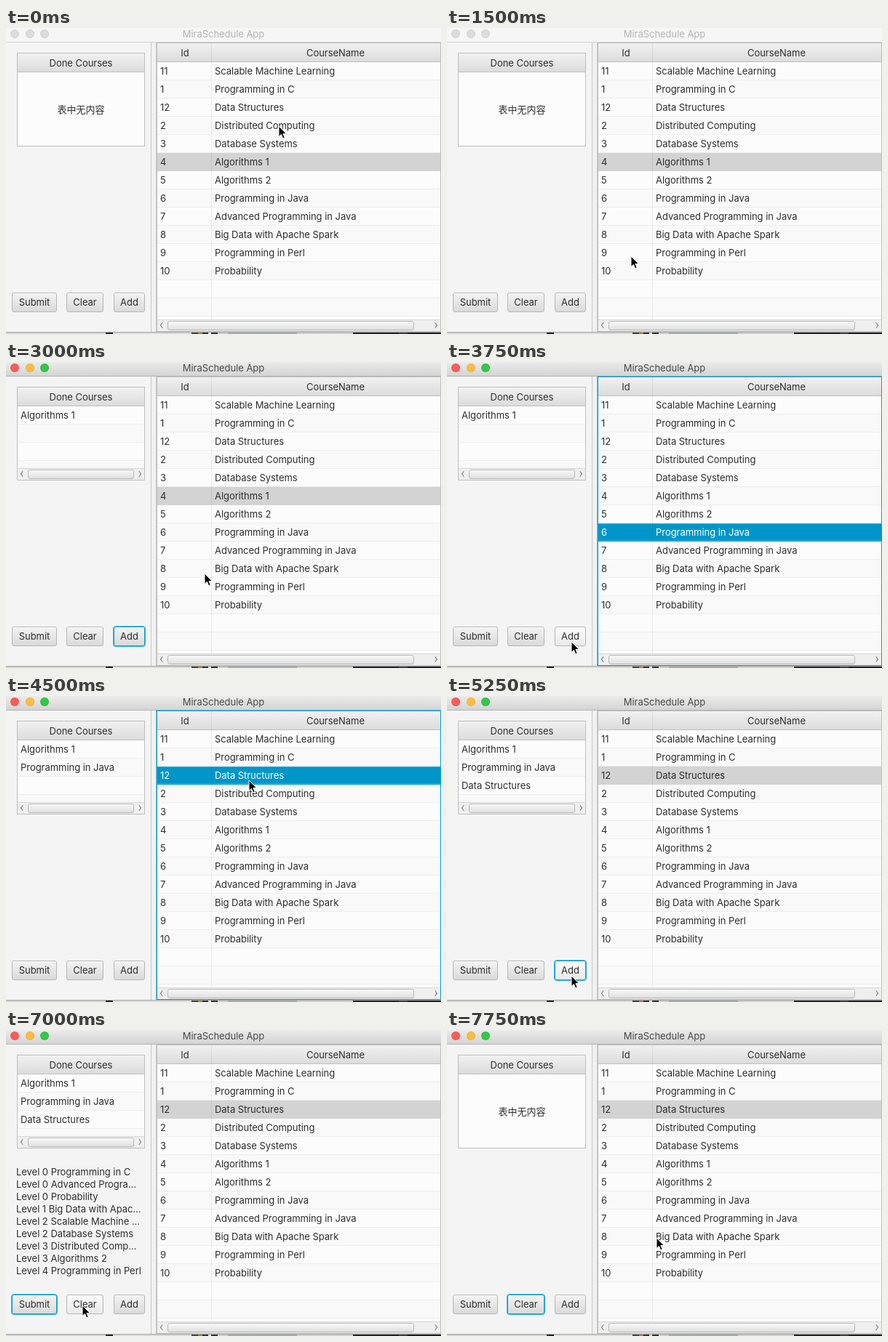
An HTML page for the animation above (8000 ms loop, 598 by 421 pixels).

```html
<!DOCTYPE html>
<html lang="en">
<head>
<meta charset="utf-8">
<title>Course planner</title>
<style>
html, body { margin: 0; width: 100%; height: 100%; overflow: hidden; }
body { position: relative; background: #f4f4f4; color: #2d2d2d; font: 13px Inter, "Noto Sans", sans-serif; letter-spacing: -.04px; cursor: default; }
div { box-sizing: border-box; white-space: pre; }
#stage { position: absolute; left: 0; top: 0; width: 598px; height: 421px; overflow: hidden; }
#stage div, #pointer { position: absolute; }

#bar { left: 0; top: 0; width: 598px; height: 20px; line-height: 17px; text-align: center; color: #b4b4b4; background: #f6f6f6; border-bottom: 1px solid #d2d2d2; }
.light { top: 2px; width: 12px; height: 12px; border-radius: 50%; background: #dcdcdc; border: 1px solid #d0d0d0; }
.active #bar { color: #484848; background: linear-gradient(#ebebeb, #d4d4d4); border-color: #b4b4b4; }
.active .light { border-color: #0001; }
.active .light:nth-child(1) { background: #fc5b57; }
.active .light:nth-child(2) { background: #fdbc40; }
.active .light:nth-child(3) { background: #33c748; }

#divider { left: 199px; top: 20px; width: 8px; height: 398px; border: solid #c8c8c8; border-width: 0 1px; background: #f1f1f1; }
.table { background: #fcfcfc; border: 1px solid #bebebe; overflow: hidden; }
#done { left: 15px; top: 34px; width: 176px; height: 129px; }
#courses { left: 207px; top: 20px; width: 391px; height: 398px; }
#courses.focused { border-color: #079fd3; box-shadow: 0 0 0 1px #079fd366; }
.head { left: 0; top: 0; width: 100%; height: 26px; line-height: 26px; text-align: center; background: linear-gradient(#f1f1f1, #dcdcdc); border-bottom: 1px solid #c0c0c0; }
.head div { top: 0; height: 26px; }
.row { left: 0; width: 100%; height: 25px; line-height: 25px; border-bottom: 1px solid #ededed; }
.row:nth-child(odd) { background: #f9f9f9; }
.row div { top: 0; left: 4px; }
.row .name { left: 79px; }
.row.picked { background: #d3d3d3; border-color: #d3d3d3; }
.focused .row.picked { background: #0096c9; border-color: #0096c9; color: #fff; box-shadow: inset 0 1px #38aed6, inset 0 -1px #38aed6; }
.rule { left: 74px; top: 0; width: 1px; height: 380px; background: #0001; }
#empty { left: 0; top: 27px; width: 100%; height: 101px; line-height: 99px; text-align: center; background: #fcfcfc; font-family: "Noto Sans CJK SC", "Noto Sans CJK", sans-serif; }

.scroll { left: 0; bottom: 0; width: 100%; height: 16px; background: #efefef; border-top: 1px solid #d6d6d6; }
.thumb { top: 1px; left: 14px; height: 13px; border: 1px solid #b8b8b8; border-radius: 3px; background: linear-gradient(#f8f8f8, #e0e0e0); }
.arrow { top: 4px; width: 6px; height: 6px; border: solid #666; border-width: 0 0 1.3px 1.3px; transform: scaleX(.7) rotate(45deg); left: 4px; }
.arrow.next { left: auto; right: 4px; transform: scaleX(.7) rotate(225deg); }

.button { top: 364px; height: 27px; line-height: 25px; text-align: center; border: 1px solid #b6b6b6; border-radius: 3px; background: linear-gradient(#f3f3f3, #dadada); box-shadow: inset 0 1px #fff; }
.button.hover { background: linear-gradient(#fbfbfb, #eaeaea); }
.button.focus { border-color: #079fd3; box-shadow: 0 0 0 .8px #079fd3, inset 0 1px #fff; }
#plan { left: 14px; top: 187px; line-height: 17px; }

#desk { left: 0; top: 418px; width: 598px; height: 3px; border-top: 1px solid #a9a9a9; background: linear-gradient(90deg, #cfcfcf 137px, #222 0 147px, #d8d8d8 0 255px, #4a4340 0 264px, #b0763f 0 270px, #333 0 278px, #ddd 0 282px, #333 0 291px, #c9cdce 0 305px, #a3adb0 0 400px, #cfcfcf 0 477px, #20242b 0 540px, #394049 0 552px, #1b1e24 0); }
#pointer { left: 0; top: 0; overflow: visible; }
</style>
</head>
<body>
<div id="stage">
  <div id="bar"><div class="light" style="left:6px"></div><div class="light" style="left:27px"></div><div class="light" style="left:47px"></div>MiraSchedule App</div>
  <div id="divider"></div>
  <div class="table" id="done"><div class="head">Done Courses</div></div>
  <div id="plan"></div>
  <div class="button" id="submit" style="left:8px;width:62px">Submit</div>
  <div class="button" id="clear" style="left:83px;width:51px">Clear</div>
  <div class="button" id="add" style="left:148px;width:43px">Add</div>
  <div class="table" id="courses"><div class="head"><div style="left:0;width:76px">Id</div><div style="left:75px;width:340px">CourseName</div></div></div>
  <div id="desk"></div>
  <svg id="pointer" width="12" height="18"><path d="M0 0V14.5L3.4 11.4L5.7 16.8L8.2 15.7L5.9 10.5H10.4Z" fill="#000" stroke="#fff" stroke-width="1" stroke-linejoin="round"/></svg>
</div>
<script>
const LOOP = 8000, STEP = 250;
const $ = id => document.getElementById(id);

const courses = [
  [11, "Scalable Machine Learning"], [1, "Programming in C"], [12, "Data Structures"],
  [2, "Distributed Computing"], [3, "Database Systems"], [4, "Algorithms 1"],
  [5, "Algorithms 2"], [6, "Programming in Java"], [7, "Advanced Programming in Java"],
  [8, "Big Data with Apache Spark"], [9, "Programming in Perl"], [10, "Probability"]
];
const added = ["Algorithms 1", "Programming in Java", "Data Structures"];
const plan = [
  "0 Programming in C", "0 Advanced Progra...", "0 Probability",
  "1 Big Data with Apac...", "2 Scalable Machine ...", "2 Database Systems",
  "3 Distributed Comp...", "3 Algorithms 2", "4 Programming in Perl"
];

function put(parent, className, text = "") {
  const el = document.createElement("div");
  el.className = className;
  el.textContent = text;
  parent.append(el);
  return el;
}

function addRows(table, count) {
  return Array.from({ length: count }, (_, i) => {
    const row = put(table, "row");
    row.style.top = 26 + 25 * i + "px";
    return row;
  });
}

function addScroll(table, thumbWidth) {
  const bar = put(table, "scroll");
  put(bar, "arrow");
  put(bar, "thumb").style.width = thumbWidth + "px";
  put(bar, "arrow next");
}

const courseRows = addRows($("courses"), 15);
courses.forEach(([id, name], i) => {
  put(courseRows[i], "", id);
  put(courseRows[i], "name", name);
});
put($("courses"), "rule");
addScroll($("courses"), 339);

const doneCells = addRows($("done"), 4).map(row => put(row, ""));
addScroll($("done"), 146);
const empty = put($("done"), "", "表中无内容");
empty.id = "empty";
empty.lang = "zh-CN";
$("plan").textContent = plan.map(line => "Level " + line).join("\n");

// Pointer tip at each step, x then y
const path = [
  375,135, 320,181, 268,227, 268,227, 266,252, 251,300, 253,314, 228,331,
  306,182, 306,182, 171,383, 171,383, 273,291, 330,234, 250,310, 171,385,
  171,385, 270,230, 334,116, 250,250, 171,385, 171,385, 100,384, 44,383,
  44,383, 44,383, 60,384, 85,381, 105,379, 105,379, 105,379, 288,286
];

// Each cue changes part of the state from its time on
const cues = [
  [0, { active: false, picked: 5, tableFocus: false, count: 0, plan: false, focus: "", hover: "" }],
  [2250, { active: true, tableFocus: true }],
  [2500, { hover: "add" }],
  [2750, { tableFocus: false, focus: "add", count: 1 }],
  [3000, { hover: "" }],
  [3250, { tableFocus: true, focus: "", picked: 7 }],
  [3750, { hover: "add" }],
  [4000, { tableFocus: false, focus: "add", count: 2 }],
  [4250, { hover: "" }],
  [4500, { tableFocus: true, focus: "", picked: 2 }],
  [5000, { hover: "add" }],
  [5250, { tableFocus: false, focus: "add", count: 3 }],
  [5500, { hover: "" }],
  [5750, { hover: "submit" }],
  [6000, { focus: "submit", plan: true }],
  [6750, { hover: "" }],
  [7000, { hover: "clear" }],
  [7500, { focus: "clear", plan: false, count: 0 }],
  [7750, { hover: "" }]
];

function draw(step) {
  const s = Object.assign({}, ...cues.filter(([at]) => at <= step * STEP).map(([, change]) => change));
  $("stage").classList.toggle("active", s.active);
  $("courses").classList.toggle("focused", s.tableFocus);
  courseRows.forEach((row, i) => row.classList.toggle("picked", i === s.picked));
  doneCells.forEach((cell, i) => { cell.textContent = i < s.count ? added[i] : ""; });
  empty.hidden = s.count > 0;
  $("plan").hidden = !s.plan;
  for (const id of ["submit", "clear", "add"]) {
    $(id).classList.toggle("focus", s.focus === id);
    $(id).classList.toggle("hover", s.hover === id);
  }
  $("pointer").style.transform = `translate(${path[2 * step]}px, ${path[2 * step + 1]}px)`;
}

let shown = -1;
function tick() {
  const step = Math.floor(performance.now() % LOOP / STEP);
  if (step !== shown) draw(shown = step);
  requestAnimationFrame(tick);
}
tick();
</script>
</body>
</html>
```
